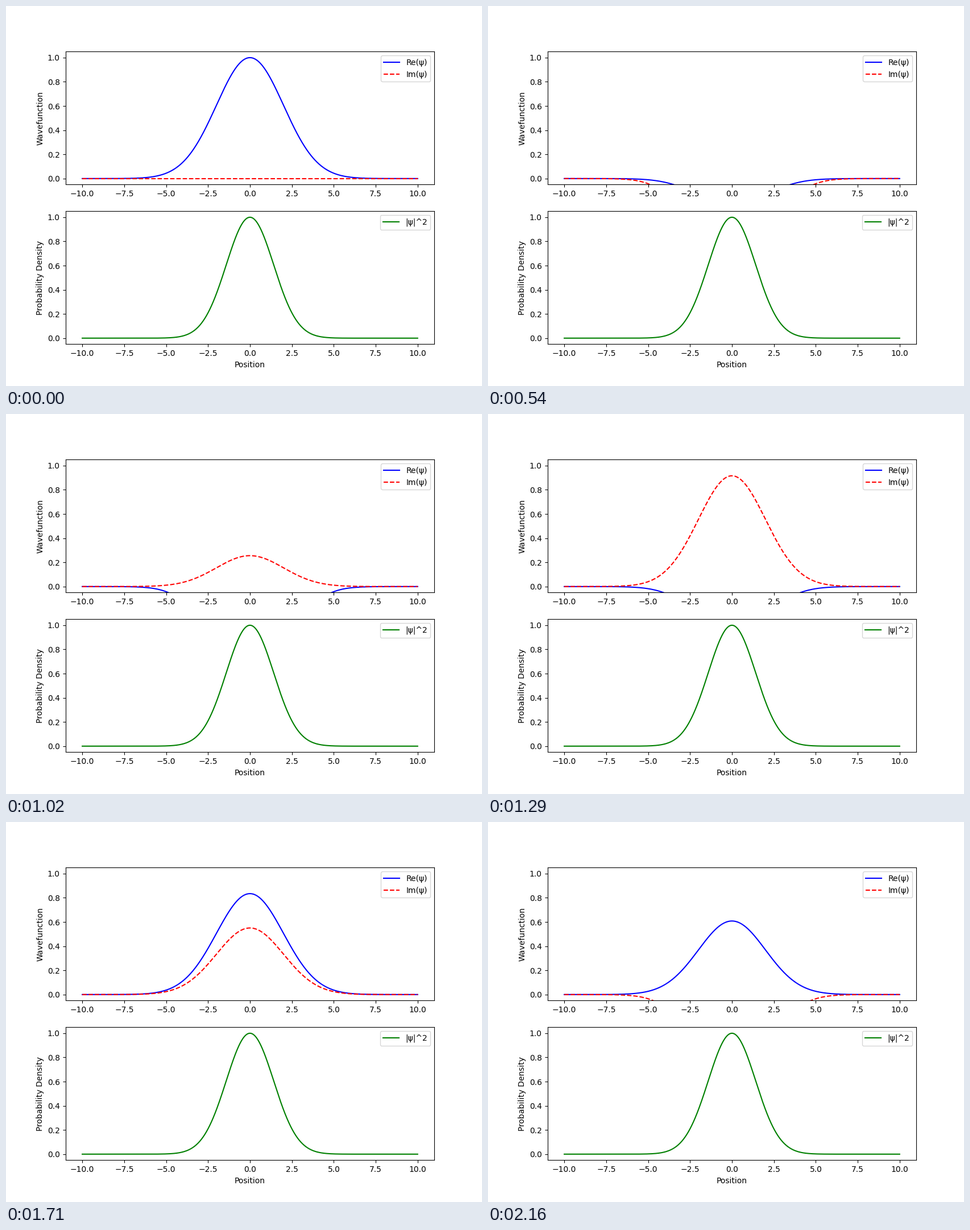
Recreate the animation shown at these times as a matplotlib script. Size 837x669 px, loop 2190 ms.

```python
import numpy as np
import matplotlib.pyplot as plt
from matplotlib.animation import FuncAnimation

FRAMES = 73
INTERVAL = 30   # ms
STEP = 0.1      # phase advance per frame
SIGMA = 2.0
DPI = 100
WIDTH, HEIGHT = 837, 669

x = np.linspace(-10, 10, 1000)
envelope = np.exp(-x**2 / (2 * SIGMA**2))


def psi(i):
    return envelope * np.exp(-1j * STEP * i)


# The small margin keeps the pixel size from truncating one short.
size = ((WIDTH + 0.01) / DPI, (HEIGHT + 0.01) / DPI)
fig, (ax_wave, ax_prob) = plt.subplots(2, 1, figsize=size, dpi=DPI)

re_line, = ax_wave.plot(x, envelope, "b-", label="Re(ψ)")
im_line, = ax_wave.plot(x, np.zeros_like(x), "r--", label="Im(ψ)")
ax_wave.set_ylabel("Wavefunction")

ax_prob.plot(x, envelope**2, "g-", label="|ψ|^2")
ax_prob.set_xlabel("Position")
ax_prob.set_ylabel("Probability Density")

for ax in (ax_wave, ax_prob):
    ax.set_xlim(-11, 11)
    ax.set_ylim(-0.05, 1.05)
    ax.legend(loc="upper right")


def update(i):
    wave = psi(i)
    re_line.set_ydata(wave.real)
    im_line.set_ydata(wave.imag)
    return re_line, im_line


anim = FuncAnimation(fig, update, frames=FRAMES, interval=INTERVAL,
                     repeat=True, repeat_delay=0)
plt.show()
```
